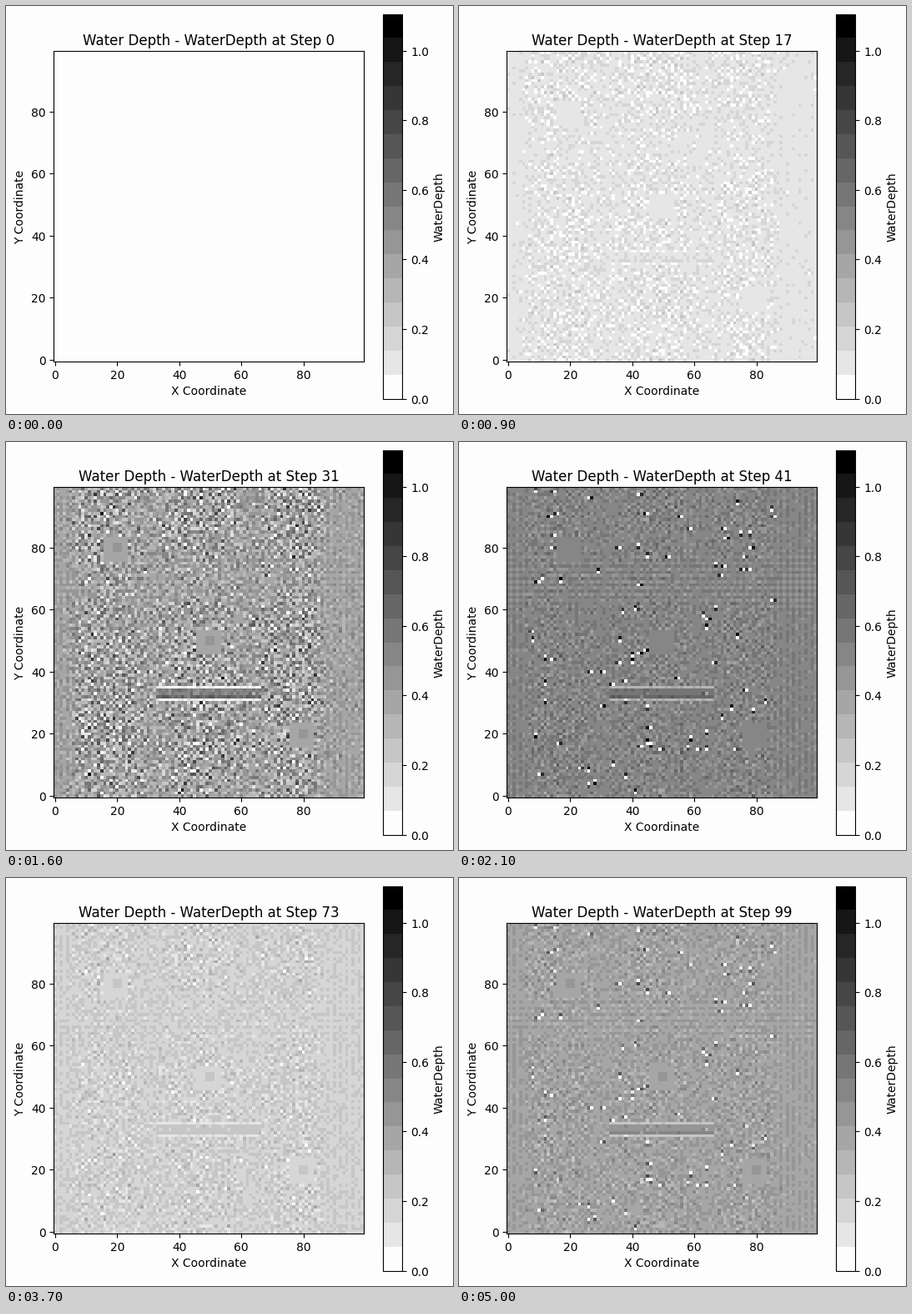
A matplotlib script for the animation above (5.1 s loop, 536 by 490 pixels).

```python
import numpy as np
import matplotlib.pyplot as plt
from matplotlib.animation import FuncAnimation
from matplotlib.colors import ListedColormap
from matplotlib.transforms import ScaledTranslation

WIDTH, HEIGHT, DPI = 536, 490, 100
N = 100
FRAMES, INTERVAL = 51, 100
MAX_DEPTH = 1.106
BACK = "#fdfdfd"

BLOCK_CENTRES = [(20, 80), (50, 50), (80, 20)]
BAR_PROFILE = np.array([-.35, .28, .12, .15, -.35])[:, None]

y, x = np.mgrid[:N, :N]


def pulse(step, centre, width):
    return np.exp(-((step - centre) / width) ** 2)


def cell_noise(seed):
    """Random cells that tend to alternate with their neighbours."""
    noise = np.random.default_rng(seed).normal(size=(N, N))
    for axis in (0, 1):
        noise = noise - .3 * np.roll(noise, 1, axis)
    return noise / noise.std()


def unstable_pairs(count, seed):
    """Drained cells, each next to an overfull one."""
    rng = np.random.default_rng(seed)
    field = np.zeros((N, N))
    for _ in range(count):
        col, row = rng.integers(7, 87), rng.integers(1, N - 1)
        shift = rng.choice([-1, 1])
        dx, dy = (shift, 0) if rng.random() < .5 else (0, shift)
        field[row, col] = -1.1
        field[row + dy, col + dx] = rng.uniform(.4, 1)
    return field


# Roughness follows the slopes of the ground, with a calm belt and calm sides.
belt = pulse(y, 69, 9)
sides = np.clip(np.minimum(x, 91 - x) / 8, .4, 1)
weight = (.6 + .45 * np.abs(np.sin(x / 10))) * (1 - .35 * belt) * sides

fixed_noise = cell_noise(7)
pairs = unstable_pairs(95, 8)
ripple = (-1.0) ** x * (1.2 - sides) + (-1.0) ** y * belt


def water_depth(step):
    if step == 0:
        return np.zeros((N, N))

    # Two floods: a short one that drains quickly and a slow one.
    mean = (.515 * pulse(step, 41, 19.5 if step < 41 else 13.5)
            + .4 * pulse(step, 99, 31))
    surge = pulse(step, 31, 5)
    rough = .062 * min(1, step / 20) + .12 * surge

    noise = .75 * fixed_noise + .66 * cell_noise(100 + step)
    depth = mean + rough * weight * noise + .07 * mean * ripple
    depth += 2 * max(0, mean - .22) * pairs

    bar = depth[31:36, 33:67]
    bar[:] = mean + BAR_PROFILE * mean * (1 + 1.4 * surge) + .3 * (bar - mean)

    for cx, cy in BLOCK_CENTRES:
        depth[cy - 4:cy + 4, cx - 4:cx + 4] = mean
        depth[cy - 1:cy + 2, cx - 1:cx + 2] += .02
    return np.clip(depth, 0, MAX_DEPTH)


def box(left, bottom, width, height):
    return [left / WIDTH, bottom / HEIGHT, width / WIDTH, height / HEIGHT]


greys = [253] + [230 - 16 * k for k in range(14)] + [0]
cmap = ListedColormap([(g / 255,) * 3 for g in greys])

fig = plt.figure(figsize=(WIDTH / DPI, HEIGHT / DPI), dpi=DPI, facecolor=BACK)
ax = fig.add_axes(box(57.1, 63.49, 372, 372.04), facecolor=BACK)
cax = fig.add_axes(box(452.35, 18.49, 23.1, 462))

image = ax.imshow(water_depth(0), cmap=cmap, vmin=0, vmax=MAX_DEPTH,
                  origin="lower", interpolation="nearest", aspect="auto")
title = ax.set_title("Water Depth - WaterDepth at Step 0")
ax.set_xlabel("X Coordinate")
ax.set_ylabel("Y Coordinate")
ax.set_xticks(range(0, N, 20))
ax.set_yticks(range(0, N, 20))
fig.colorbar(image, cax=cax, label="WaterDepth", ticks=np.arange(6) / 5)

# Text sits half a pixel below the lines; the x label follows its tick labels.
half_down = ScaledTranslation(0, -.5 / DPI, fig.dpi_scale_trans)
texts = [title, ax.yaxis.label, cax.yaxis.label]
for axis in (ax.xaxis, ax.yaxis, cax.yaxis):
    texts += axis.get_ticklabels()
for text in texts:
    text.set_transform(text.get_transform() + half_down)


def update(frame):
    step = max(0, 2 * frame - 1)
    image.set_data(water_depth(step))
    title.set_text(f"Water Depth - WaterDepth at Step {step}")
    return image, title


anim = FuncAnimation(fig, update, frames=FRAMES, interval=INTERVAL,
                     repeat=True, repeat_delay=0, blit=False)
plt.show()
```
